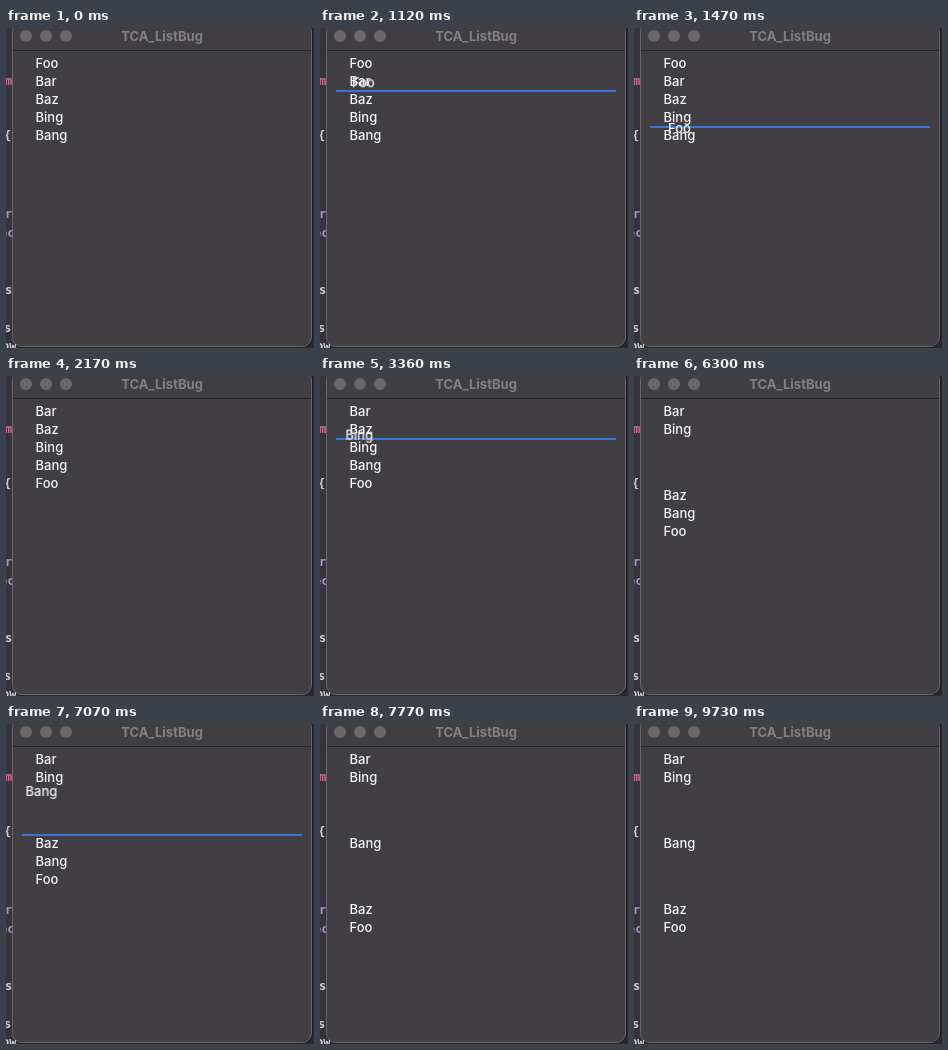
Animation, 308 px wide and 320 px high, one loop 9.8 s. Source, as an HTML page:

```html
<!DOCTYPE html>
<html lang="en">
<head>
<meta charset="utf-8">
<title>TCA_ListBug</title>
<style>
  html, body { margin: 0; width: 100%; height: 100%; overflow: hidden; background: #29282d; }
  .stage { position: relative; width: 308px; height: 320px; overflow: hidden; }

  /* Code editor peeking out behind the window */
  .code { position: absolute; left: 0; top: 0; width: 8px; height: 320px; background: #36343a; }
  .code span {
    position: absolute; left: -1px; height: 18px; margin-top: -9px;
    font: bold 12px/18px "DejaVu Sans Mono", monospace; color: #d0cfd3;
  }
  .code .key { color: #c9748f; }
  .code .type { color: #a596c8; }

  .window {
    position: absolute; left: 6px; top: -6px; width: 300px; height: 325px;
    box-sizing: border-box; border: 1px solid #68676b; border-radius: 10px;
    background: #413f44; box-shadow: 1px 0 #1d1c20; overflow: hidden;
  }
  .bar { height: 27px; background: #403e43; border-bottom: 1px solid #252428; }
  .dot {
    position: absolute; top: 7px; width: 12px; height: 12px;
    border-radius: 50%; background: #69676c;
  }
  .title {
    position: absolute; left: 0; top: -1px; width: 312px; text-align: center;
    font: 700 13px/18px Inter, sans-serif; color: #828085;
  }

  .row, .drag {
    position: absolute; left: 1px; top: -9px;
    font: 500 13px/18px Inter, sans-serif; color: #f4f3f5; white-space: nowrap;
  }
  .row { left: 29.5px; animation: order 9.8s step-end infinite; }
  .drag { opacity: 0; animation: 9.8s step-end infinite; }
  .line {
    position: absolute; left: 16px; top: -1px; width: 280px; height: 2px;
    background: #3b77d2; opacity: 0; animation: insert 9.8s step-end infinite;
  }

  /* The list order after each drop */
  @keyframes order {
    0% { transform: translateY(var(--a)); }
    20% { transform: translateY(var(--b)); }
    41.428% { transform: translateY(var(--c)); }
    77.857%, 100% { transform: translateY(var(--d)); }
  }

  .foo { animation-name: drag-foo; }
  @keyframes drag-foo {
    0% { opacity: 0; }
    10% { opacity: 1; transform: translate(30px, 36px); animation-timing-function: steps(7); }
    15% { opacity: 1; transform: translate(33px, 100px); animation-timing-function: steps(6); }
    19.285% { opacity: 1; transform: translate(34px, 117px); }
    20%, 100% { opacity: 0; transform: translate(34px, 117px); }
  }

  .bing { animation-name: drag-bing; }
  @keyframes drag-bing {
    0% { opacity: 0; }
    32.857% { opacity: 1; transform: translate(28px, 69px); animation-timing-function: steps(6); }
    37.142% { opacity: 1; transform: translate(17px, 38px); }
    41.428%, 100% { opacity: 0; transform: translate(17px, 38px); }
  }

  .bang { animation-name: drag-bang; }
  @keyframes drag-bang {
    0% { opacity: 0; }
    67.857% { opacity: 1; transform: translate(28px, 134px); animation-timing-function: steps(6); }
    72.142% { opacity: 1; transform: translate(18.5px, 67px); }
    77.857%, 100% { opacity: 0; transform: translate(18.5px, 67px); }
  }

  @keyframes insert {
    0% { opacity: 0; transform: translateY(45px); }
    10% { opacity: 1; transform: translateY(45px); }
    11.428% { opacity: 1; transform: translateY(63px); }
    12.857% { opacity: 1; transform: translateY(81px); }
    14.285% { opacity: 1; transform: translateY(99px); }
    16.428% { opacity: 1; transform: translateY(117px); }
    20% { opacity: 0; transform: translateY(63px); }
    32.857% { opacity: 1; transform: translateY(63px); }
    35.714% { opacity: 1; transform: translateY(45px); }
    41.428% { opacity: 0; transform: translateY(129px); }
    67.857% { opacity: 1; transform: translateY(129px); }
    69.285% { opacity: 1; transform: translateY(111px); }
    77.857%, 100% { opacity: 0; transform: translateY(111px); }
  }
</style>
</head>
<body>
<div class="stage">
  <div class="code">
    <span class="key" style="top:53px">m</span>
    <span style="top:71px;left:-5px">)</span>
    <span style="top:108px;left:-2px">{</span>
    <span class="type" style="top:186px">r</span>
    <span class="type" style="top:205px;left:-6px">ec</span>
    <span style="top:262px">s</span>
    <span style="top:300px;left:-2px">s</span>
    <span style="top:318px;left:-4px">ow</span>
  </div>
  <div class="window">
    <div class="bar"></div>
    <i class="dot" style="left:7px"></i>
    <i class="dot" style="left:27px"></i>
    <i class="dot" style="left:47px"></i>
  </div>
  <div class="title">TCA_ListBug</div>

  <div class="row" style="--a:35px;--b:107px;--c:155px;--d:203px">Foo</div>
  <div class="row" style="--a:53px;--b:35px;--c:35px;--d:35px">Bar</div>
  <div class="row" style="--a:71px;--b:53px;--c:119px;--d:185px">Baz</div>
  <div class="row" style="--a:89px;--b:71px;--c:53px;--d:53px">Bing</div>
  <div class="row" style="--a:107px;--b:89px;--c:137px;--d:119px">Bang</div>

  <div class="line"></div>
  <div class="drag foo">Foo</div>
  <div class="drag bing">Bing</div>
  <div class="drag bang">Bang</div>
</div>
</body>
</html>
```
